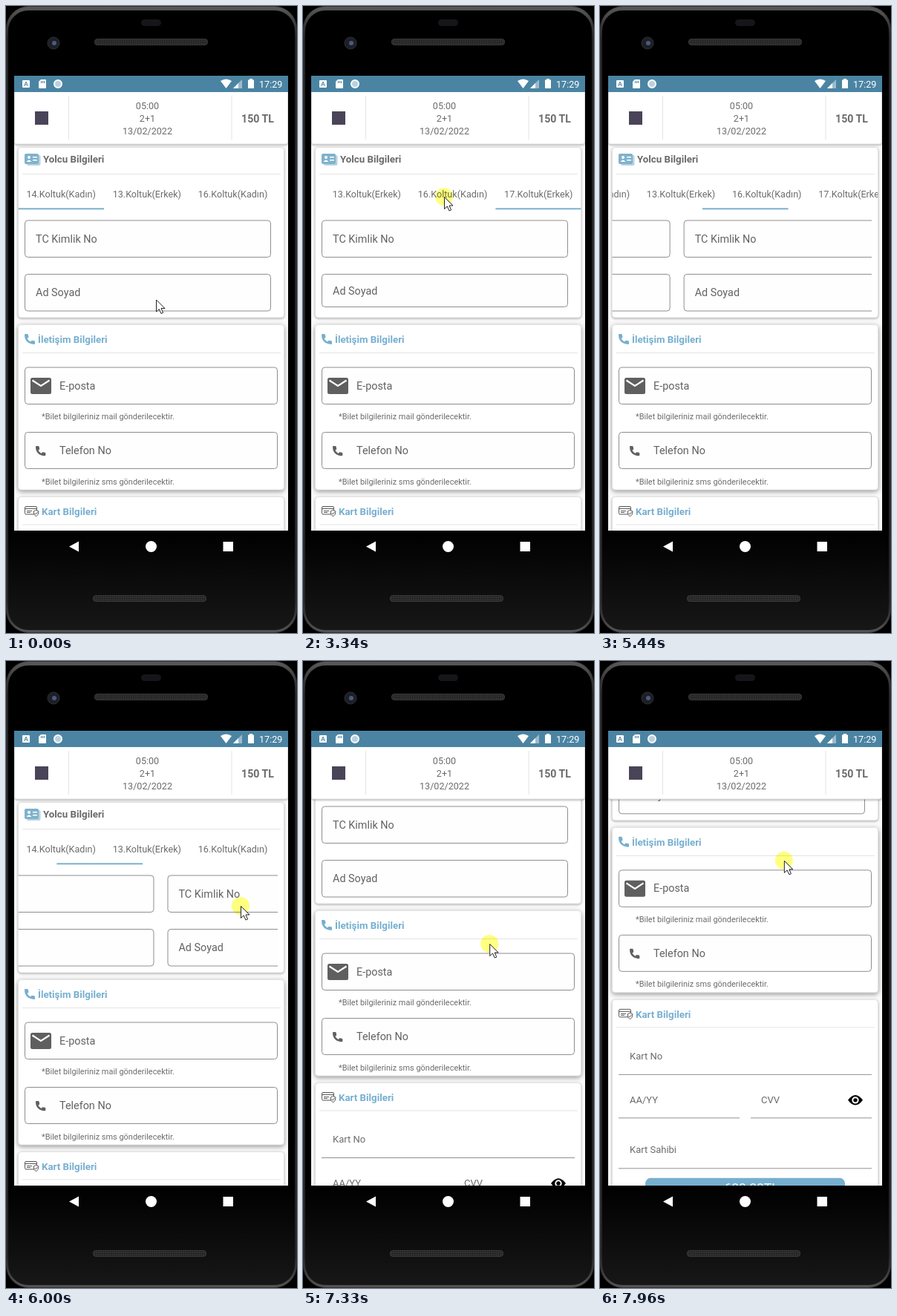
An HTML page that plays this animation: 392 px wide and 845 px high, repeating every 8 s.

```html
<!DOCTYPE html>
<html lang="tr">
<head>
<meta charset="utf-8">
<title>Yolcu Bilgileri</title>
<style>
html, body { margin: 0; width: 100%; height: 100%; overflow: hidden; background: #000; }
svg { display: block; }
text { font: 12.6px Roboto, sans-serif; fill: #6c6c6c; }
.mid { text-anchor: middle; }
.head { font-size: 13.3px; font-weight: 700; fill: #76afd0; }
.label { font-size: 14.4px; fill: #626262; }
.note { font-size: 10.95px; }
.input { font-size: 13px; }
.card { fill: #fff; stroke: #e2e2e2; filter: drop-shadow(0 1px 1.5px #0005); }
.raised { filter: drop-shadow(0 2px 3px #0006); }
.box { fill: #fefefe; stroke: #8e8e8e; }
.rule { stroke: #e4e4e4; }
.under { stroke: #909090; }
</style>
</head>
<body>
<svg width="392" height="845" viewBox="0 0 392 845">
  <defs>
    <linearGradient id="rim" x2="0" y2="1">
      <stop offset="0" stop-color="#5a5a5a"/><stop offset=".05" stop-color="#242424"/>
      <stop offset=".95" stop-color="#242424"/><stop offset="1" stop-color="#555"/>
    </linearGradient>
    <linearGradient id="shell" x2="0" y2="1">
      <stop offset=".84" stop-color="#000"/><stop offset="1" stop-color="#171717"/>
    </linearGradient>
    <linearGradient id="glowFill">
      <stop offset="0" stop-color="#cfe5f1"/><stop offset="1" stop-color="#e4f1f8"/>
    </linearGradient>
    <pattern id="mesh" width="3" height="3" patternUnits="userSpaceOnUse">
      <path d="M0 0H3V3H0Z" fill="#303030"/><path d="M0 0H1.5V1.5H0Z" fill="#1b1b1b"/>
    </pattern>
    <clipPath id="screen"><path d="M11 94H380V707H11Z"/></clipPath>
    <clipPath id="body"><path d="M11 184H380V707H11Z"/></clipPath>
    <clipPath id="tabClip"><path d="M16.5 232H374.5V276H16.5Z"/></clipPath>
    <clipPath id="pageClip"><path d="M16.5 276H366V416H16.5Z"/></clipPath>
    <path id="handset" d="M1 0H4Q5 0 5.500 4.500L3.600 6.300Q5.300 9 8 10.400L9.500 8.700Q14 9 14 10V13Q14 14 13 14Q0 13 0 1Q0 0 1 0Z"/>
  </defs>

  <!-- phone -->
  <rect x=".5" y=".5" width="391" height="844" rx="30" fill="url(#rim)" stroke="#303030"/>
  <rect x="3" y="6" width="386" height="835" rx="27" fill="url(#shell)"/>
  <rect x="182" y="18" width="27" height="9" rx="4.500" fill="#15151a"/>
  <g fill="url(#mesh)" stroke="#3a3a3a">
    <rect x="119.500" y="44.500" width="152" height="8" rx="3.500"/>
    <rect x="117.500" y="794.500" width="152" height="8" rx="3.500"/>
  </g>
  <circle cx="64" cy="50" r="8" fill="#1d1f25" stroke="#2e3036"/>
  <circle cx="65" cy="50" r="3" fill="#4a5a80"/>

  <g clip-path="url(#screen)">
    <path d="M11 94H380V707H11Z" fill="#fafafa"/>

    <g clip-path="url(#body)"><g id="content">
      <rect class="card" x="16.500" y="190.500" width="358" height="229.500" rx="4"/>
      <rect x="28" y="201" width="18.500" height="14" rx="2" fill="#b5d3e2"/>
      <rect x="25" y="199" width="19" height="14" rx="2" fill="#7fb2cb"/>
      <circle cx="31" cy="204" r="2" fill="#fff"/>
      <path d="M27.500 210Q31 205 34.500 210ZM36 203H42V204.500H36ZM36 207H42V208.500H36Z" fill="#fff"/>
      <text class="head" x="50" y="211" style="fill:#6a6a6a">Yolcu Bilgileri</text>
      <path class="rule" d="M22 226.500H370"/>
      <g clip-path="url(#tabClip)">
        <g id="tabs"></g>
        <rect id="indicator" y="272.300" width="115.700" height="2" fill="#7ab0cf"/>
      </g>
      <g clip-path="url(#pageClip)"><g id="pages"></g></g>
      <path id="glow" d="M16.500 275H23Q20 345 23 419H16.500Z" fill="url(#glowFill)"/>

      <rect class="card raised" x="16.500" y="429.500" width="358" height="222.500" rx="4"/>
      <use href="#handset" x="25" y="442" fill="#76afd0"/>
      <text class="head" x="43" y="454">İletişim Bilgileri</text>
      <path class="rule" d="M22 467.500H370"/>
      <rect class="box" x="25.500" y="487" width="340" height="49.500" rx="4"/>
      <rect x="33" y="501" width="28" height="22" rx="2.500" fill="#5f5f5f"/>
      <path d="M35.500 504.500L47 512L58.500 504.500" fill="none" stroke="#fff" stroke-width="2.200"/>
      <text class="label" x="72" y="516.500">E-posta</text>
      <text class="note" x="48" y="557">*Bilet bilgileriniz mail gönderilecektir.</text>
      <rect class="box" x="25.500" y="574.500" width="340" height="49" rx="4"/>
      <use href="#handset" transform="translate(40 593) scale(.95)" fill="#606060"/>
      <text class="label" x="72" y="604">Telefon No</text>
      <text class="note" x="48" y="644.500">*Bilet bilgileriniz sms gönderilecektir.</text>

      <rect class="card" x="16.500" y="661.500" width="358" height="320" rx="4"/>
      <g fill="none" stroke="#444" stroke-width=".9">
        <rect x="25.500" y="674.500" width="16" height="10.500" rx="1.500"/>
        <path d="M26 677.500H41M28 680.500H35M28 682.500H33"/>
        <path d="M37 681L40.500 679.500L44 681Q44 686 40.500 688Q37 686 37 681Z" fill="#fff"/>
        <path d="M38.800 683.500L40.200 685L42.500 682"/>
      </g>
      <text class="head" x="48" y="686">Kart Bilgileri</text>
      <path class="rule" d="M22 699H370"/>
      <text class="input" x="40" y="742">Kart No</text>
      <text class="input" x="40" y="801">AA/YY</text>
      <text class="input" x="217" y="801">CVV</text>
      <text class="input" x="40" y="868.500">Kart Sahibi</text>
      <path class="under" d="M25 762.500H366M25 821H188M203 821H366M25 889H366"/>
      <path d="M334 797Q344 783.500 354 797Q344 810.500 334 797Z"/>
      <circle cx="344" cy="797" r="3.700" stroke="#fff" stroke-width="2"/>
      <rect x="61" y="902" width="269" height="38" rx="7" fill="#76afd0"/>
      <text class="mid" x="204" y="921" style="font-size:17.400px;fill:#fff">600.00TL</text>
    </g></g>

    <!-- trip header -->
    <rect class="card" x="11.500" y="110" width="368" height="76" rx="3"/>
    <path class="rule" d="M84.500 121V180M304 121V180"/>
    <rect x="39" y="142" width="18" height="18" fill="#4a4458"/>
    <g class="mid">
      <text x="190.500" y="138.500">05:00</text>
      <text x="190.500" y="156">2+1</text>
      <text x="190.500" y="173">13/02/2022</text>
      <text x="339" y="156.500" style="font-size:14.200px;font-weight:700">150 TL</text>
    </g>

    <!-- status bar -->
    <path d="M11 94H380V116H11Z" fill="#4b84a3"/>
    <g fill="#fff">
      <rect x="22" y="100" width="10" height="10" rx="1"/>
      <path d="M24.500 108L27 102L29.500 108M25.500 106H28.500" fill="none" stroke="#4b84a3"/>
      <path d="M47 99H53Q54 99 54 100V110Q54 111 53 111H45Q44 111 44 110V102Z"/>
      <path d="M47.500 101V104M49.500 101V104M51.500 101V104" stroke="#4b84a3"/>
      <circle cx="70" cy="105" r="5" fill="#b9d2df" stroke="#fff" stroke-width="2"/>
      <path d="M289 101Q296.500 96 304 101L296.500 111Z"/>
      <path d="M318 99V111H306Z" opacity=".45"/>
      <path d="M313 104V111H306Z"/>
      <path d="M328 98H332V99.500H334V111H326V99.500H328Z"/>
      <text x="341" y="109.500" style="fill:#fff">17:29</text>
    </g>
  </g>

  <g fill="#fff">
    <path d="M85 728.500L98 721.500V735.500Z"/>
    <circle cx="195.500" cy="728.500" r="7.500"/>
    <path d="M292.500 722H306V735H292.500Z"/>
  </g>

  <g id="pointer">
    <circle id="press" r="12" fill="#ffff80" style="mix-blend-mode:multiply"/>
    <path d="M.5 .5V16.500L4.300 13L7 19L9.600 17.900L7 12H12Z" fill="#fff" stroke="#222"/>
  </g>
</svg>
<script>
const LOOP = 8000, STEP = 70, PHASE = 50;
const TAB = 115.7, PAGE = 350, MAX_TAB_SCROLL = 104;
const SLIDE = 300, TAP_DELAY = 59, INDICATOR_LAG = 75, PRESS = 80;
const SCROLL_START = 7050;
const seats = ['14.Koltuk(Kadın)', '13.Koltuk(Erkek)', '16.Koltuk(Kadın)', '17.Koltuk(Erkek)'];

const el = id => document.getElementById(id);
const clamp = (v, lo, hi) => Math.min(hi, Math.max(lo, v));
const mix = (a, b, p) => a + (b - a) * p;
const ease = (t, start, length) => {
  const p = clamp((t - start) / length, 0, 1);
  return p * p * (3 - 2 * p);
};
const move = (id, x, y = 0) => el(id).setAttribute('transform', `translate(${x} ${y})`);
const show = (id, opacity) => el(id).setAttribute('opacity', opacity);

const rest = (at, x, y, hold = 0) => ({ at, x, y, hold, dx: 0, press: -PRESS });
const tap = (at, x, y, page) =>
  ({ at, x, y, page, hold: 180, dx: 0, press: PRESS, slideAt: at + TAP_DELAY, lag: INDICATOR_LAG });
const swipe = (at, x, y, dx, page) =>
  ({ at, x, y, page, hold: SLIDE, dx, press: SLIDE, slideAt: at, lag: 0 });

const gestures = [
  rest(0, 202, 395.5, 330),
  tap(820, 190, 258, 1),
  tap(1480, 288, 248, 2),
  tap(2750, 361, 245, 3),
  tap(3320, 190, 257, 2),
  swipe(5342, 410, 330, 0, 1),
  swipe(5840, 250, 330, 120, 0),
  swipe(6380, 250, 330, 100, 0),
  rest(6770, 258, 430),
  rest(SCROLL_START, 254, 474),
];

const field = (x, y, h, label) =>
  `<rect class="box" x="${x + 25.5}" y="${y}" width="331" height="${h}" rx="4"/>
   <text class="label" x="${x + 40}" y="${y + h / 2 + 5}">${label}</text>`;
seats.forEach((seat, i) => {
  const last = i === seats.length - 1;
  el('tabs').innerHTML += `<text class="mid" x="${16.3 + TAB * (i + .5)}" y="258">${seat}</text>`;
  el('pages').innerHTML += field(i * PAGE, 289, 49.5, 'TC Kimlik No') +
    field(i * PAGE, 361.5, last ? 44 : 49.5, 'Ad Soyad');
});

function pageAt(t, lagging) {
  return gestures.filter(g => g.slideAt).reduce((page, g) =>
    mix(page, g.page, ease(t, g.slideAt + (lagging ? g.lag : 0), SLIDE)), 0);
}

function pointerAt(t, scroll) {
  if (t >= SCROLL_START) return [254 - scroll * .03, 474 - scroll];
  const i = gestures.findLastIndex(g => g.at <= t);
  const from = gestures[i], to = gestures[i + 1];
  const left = from.at + from.hold;
  const x = from.x + from.dx * ease(t, from.at, from.hold || 1);
  const p = ease(t, left, to.at - left);
  return [mix(x, to.x, p), mix(from.y, to.y, p)];
}

function draw() {
  // The picture advances in fixed steps, like a screen recording.
  const now = performance.now() % LOOP;
  const t = Math.max(0, Math.floor((now - PHASE) / STEP) * STEP + PHASE);

  const page = pageAt(t, false);
  const tabScroll = clamp(page * TAB - 121.6, 0, MAX_TAB_SCROLL);
  move('tabs', -tabScroll);
  move('indicator', 16.3 + pageAt(t, true) * TAB - tabScroll);
  move('pages', -page * PAGE);

  const scroll = 282 * (1 - Math.exp(-Math.max(0, t - SCROLL_START) / 700));
  move('content', 0, -scroll);
  move('pointer', ...pointerAt(t, scroll));

  const pressed = t >= SCROLL_START ||
    gestures.some(g => t >= g.at - PRESS && t < g.at + g.press);
  show('press', pressed ? 1 : 0);
  show('glow', Math.max(0, 1 - Math.abs(t - 6600) / 380));
  requestAnimationFrame(draw);
}
draw();
</script>
</body>
</html>
```
